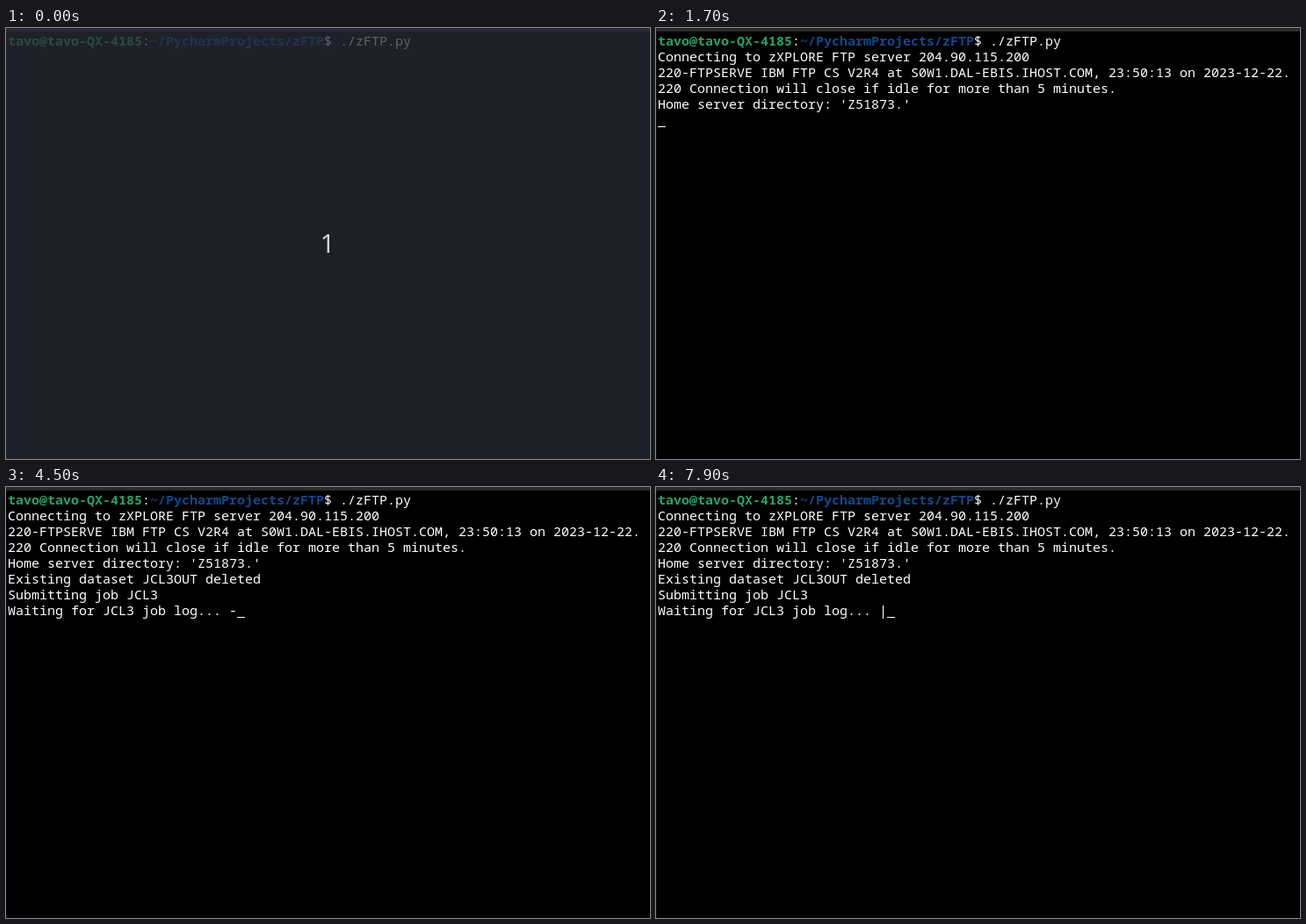
An HTML page that plays this animation: 733 by 491 pixels, repeating every 8000 ms.

```html
<!DOCTYPE html>
<html lang="en">
<head>
<meta charset="utf-8">
<title>Terminal session</title>
<style>
  html, body { margin: 0; width: 100%; height: 100%; overflow: hidden; background: #000; }
  svg { display: block; width: 733px; height: 491px; }
  text { white-space: pre; fill: #fff; }
  #screen text { font: 15px "Noto Sans Mono", "DejaVu Sans Mono", monospace; }
  #screen .user { font-weight: 700; fill: #26a269; }
  #screen .path { font-weight: 700; fill: #12488b; }
  #count { font: 30px "Open Sans", "Noto Sans", sans-serif; fill: #d6d7d9; text-anchor: middle; }
</style>
</head>
<body>
<svg viewBox="0 0 733 491" xmlns="http://www.w3.org/2000/svg">
  <rect width="733" height="491"/>
  <rect width="733" height="4" fill="#2b2b2b"/>
  <rect y="4" width="1" height="487" fill="#07151f"/>
  <g id="screen">
    <text x="2" y="20"><tspan class="user">tavo@tavo-QX-4185</tspan>:<tspan class="path">~/PycharmProjects/zFTP</tspan>$ ./zFTP.py</text>
    <rect id="cursor" width="9" height="1" fill="#fff"/>
  </g>
  <g id="intro">
    <rect width="733" height="491" fill="#292d37" opacity=".75"/>
    <text id="count" x="366" y="256">1</text>
  </g>
</svg>
<script>
const LOOP = 8000, STEP = 100, ROW = 18, COL = 9, LEFT = 2;
const PROMPT_COLS = 51;

// Each output row: time it is printed, text
const output = [
  [600, "Connecting to zXPLORE FTP server 204.90.115.200"],
  [1100, "220-FTPSERVE IBM FTP CS V2R4 at S0W1.DAL-EBIS.IHOST.COM, 23:50:13 on 2023-12-22."],
  [1100, "220 Connection will close if idle for more than 5 minutes."],
  [1200, "Home server directory: 'Z51873.'"],
  [2300, "Existing dataset JCL3OUT deleted"],
  [2400, "Submitting job JCL3"],
  [2500, "Waiting for JCL3 job log... "]
];
const SPINNER = "-\\|/";
const spinStart = 2500;
// Steps on which the spinner keeps its last glyph
const holds = [2900, 3400, 3900, 4400, 4800, 5000, 5300, 5900, 6400, 6900, 7400, 7800];

const screen = document.getElementById("screen");
const cursor = document.getElementById("cursor");
const intro = document.getElementById("intro");

const rows = output.map(([, content], i) => {
  const row = document.createElementNS("http://www.w3.org/2000/svg", "text");
  row.setAttribute("x", LEFT);
  row.setAttribute("y", 20 + ROW * (i + 1));
  row.textContent = content;
  return screen.insertBefore(row, cursor);
});

const show = (node, on) => node.setAttribute("visibility", on ? "visible" : "hidden");

function spinnerAt(t) {
  const steps = Math.floor((t - spinStart) / STEP) - holds.filter(h => h <= t).length;
  return SPINNER[steps % SPINNER.length];
}

function cursorOn(t) {
  if (t < 1100) return t >= 400;
  return Math.floor((t - 1100) / 600) % 2 === 1;
}

function render(t) {
  show(intro, t < 100);
  rows.forEach((row, i) => show(row, t >= output[i][0]));

  const printed = output.filter(([at]) => t >= at).length;
  const last = output.length - 1;
  const waiting = t >= spinStart;
  const waitText = output[last][1];
  if (waiting) rows[last].textContent = waitText + spinnerAt(t);

  let line = printed + 1, column = 0;
  if (!printed) [line, column] = [0, PROMPT_COLS];
  if (waiting) [line, column] = [output.length, waitText.length + 1];
  cursor.setAttribute("x", LEFT + COL * column);
  cursor.setAttribute("y", 22 + ROW * line);
  show(cursor, cursorOn(t));
}

const start = performance.now();
function tick() {
  render((performance.now() - start) % LOOP);
  requestAnimationFrame(tick);
}
render(0);
requestAnimationFrame(tick);
</script>
</body>
</html>
```
